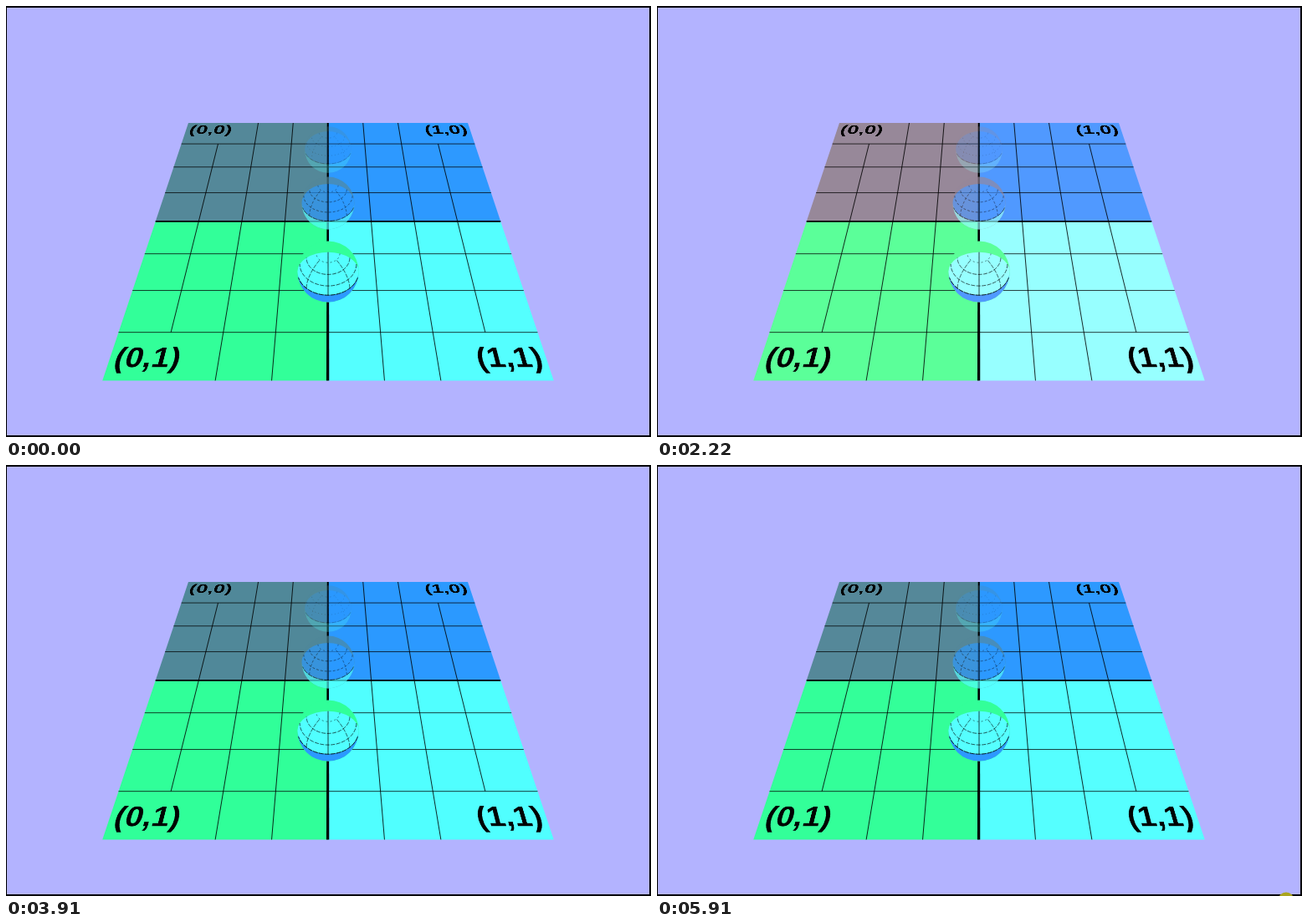
Write an HTML page that moves like this. It is 771 px wide and 516 px high and loops after 5.99 s.

```html
<!DOCTYPE html>
<html lang="en">
<head>
<meta charset="utf-8">
<title>Texture coordinates</title>
<style>
  html, body { margin: 0; width: 100%; height: 100%; overflow: hidden; background: #b3b3ff; }
  #stage { --r: 84; position: absolute; left: 0; top: 0; width: 771px; height: 516px; overflow: hidden; background: #b3b3ff; }
  svg { position: absolute; left: 0; top: 0; display: block; }
  .red { fill: rgb(var(--r), 136, 153); }
  .blue { fill: rgb(calc(var(--r) * .533), 153, 255); }
  .green { fill: rgb(calc(var(--r) * .6), 255, 153); }
  .white { fill: rgb(var(--r), 255, 255); }
  .line { fill: none; stroke: #000; }
  .frame { position: absolute; inset: 0; border: solid #000; border-width: 2px 2px 2px 1px; }
  /* Projects the unit square (1000 x 1000) onto the floor. */
  #labels {
    transform-origin: 0 0;
    transform: matrix3d(.334, 0, 0, 0, -.14665, .13765, 0, -.0003809, 0, 0, 1, 0, 218, 140, 0, 1);
    font: bold 73px "Liberation Sans", Arial, sans-serif;
  }
  .end { text-anchor: end; }
  #dot { fill: #aaa51e; visibility: hidden; }
</style>
</head>
<body>
<div id="stage">
  <svg id="floor" width="771" height="516"></svg>
  <svg id="labels" width="1000" height="1000">
    <text x="12" y="66">(0,0)</text>
    <text x="990" y="66" class="end">(1,0)</text>
    <text x="12" y="967">(0,1)</text>
    <text x="990" y="967" class="end">(1,1)</text>
  </svg>
  <svg id="balls" width="771" height="516"></svg>
  <div class="frame"></div>
  <svg width="771" height="516"><circle id="dot" cx="752" cy="521" r="9.5"/></svg>
</div>
<script>
const $ = id => document.getElementById(id);
const CX = 385;
const fix = n => n.toFixed(2);

function add(parent, tag, attrs) {
  const el = document.createElementNS('http://www.w3.org/2000/svg', tag);
  for (const k in attrs) el.setAttribute(k, attrs[k]);
  return parent.appendChild(el);
}

// Floor coordinates (0..1) to the stage.
function project(u, v) {
  const w = 334 / (1 - .3809 * v);
  return [CX + (u - .5) * w, 140 + 1.5012 * (w - 334)];
}

function points(list) {
  return list.map(([u, v]) => project(u, v).map(fix).join()).join(' ');
}

function drawFloor() {
  const svg = $('floor');
  const quad = (cls, u, v) => add(svg, 'polygon', {
    class: cls, points: points([[u, v], [u + .5, v], [u + .5, v + .5], [u, v + .5]])
  });
  const line = (a, b, width) => add(svg, 'polyline', {
    class: 'line', 'stroke-width': width, points: points([a, b])
  });
  quad('red', 0, 0);
  quad('blue', .5, 0);
  quad('green', 0, .5);
  quad('white', .5, .5);
  for (let i = 1; i < 8; i++) {
    const t = i / 8;
    const cut = i === 1 || i === 7 ? 1 / 8 : 0;
    line([0, t], [1, t], i === 4 ? 1.8 : .75);
    if (i !== 4) line([t, cut], [t, 1 - cut], .85);
  }
  const left = .4962, right = .5024;
  add(svg, 'polygon', { points: points([[left, 0], [right, 0], [right, 1], [left, 1]]) });
}

// A globe seen from above; tilt is the sine of the viewing elevation.
function drawBall(cy, r, tilt, alpha, [cap, main, south], dash) {
  const rise = Math.sqrt(1 - tilt * tilt);
  const g = add($('balls'), 'g', { transform: `translate(${CX} ${cy})`, opacity: alpha });
  const low = fix(r * tilt), high = fix(r * rise);
  add(g, 'circle', { class: cap, r });
  add(g, 'path', { class: main, d: `M${-r} 0A${r} ${high} 0 0 1 ${r} 0A${r} ${low} 0 0 1 ${-r} 0Z` });
  add(g, 'path', { class: south, d: `M${-r} 0A${r} ${low} 0 0 0 ${r} 0A${r} ${r} 0 0 1 ${-r} 0Z` });

  const curve = (at, width, pattern) => {
    let d = '';
    for (let i = 0; i <= 60; i++) {
      const [lat, lon] = at(i / 60).map(a => a * Math.PI / 180);
      const up = Math.sin(lat), out = Math.cos(lat) * Math.sin(lon);
      d += (i ? 'L' : 'M') + fix(r * Math.cos(lat) * Math.cos(lon)) + ' ' + fix(r * (out * tilt - up * rise));
    }
    add(g, 'path', { class: 'line', d, 'stroke-width': width, 'stroke-dasharray': pattern });
  };
  for (const lat of [22.5, 45]) curve(s => [lat, s * 180], .65, dash);
  curve(s => [67.5, s * 180], .5, '2 3');
  curve(s => [0, 15 + s * 150], .9, '6 1');
  for (const lon of [45, 135]) curve(s => [s * 67.5, lon], .65, dash);
  curve(s => [s * 90, 90], .8, 'none');
}

drawFloor();
drawBall(172, 27.8, .61, .25, ['red', 'blue', 'white'], '1 3');
drawBall(236, 31.5, .68, .66, ['red', 'blue', 'white'], '3 2');
drawBall(318, 36.6, .77, 1, ['green', 'white', 'blue'], '5 1.5');

// Red ramps up about once a second and drops back to zero: [step, phase].
const LOOP = 5990, STEPS = 78;
const ramp = [[0, .328], [9, 1.0001], [20, 1.884], [37, 3.22], [51, 4.314], [62, 5.133], [77, 6.333]];

function phase(n) {
  const i = Math.max(1, ramp.findIndex(([step]) => step >= n));
  const [n0, p0] = ramp[i - 1], [n1, p1] = ramp[i];
  return p0 + (p1 - p0) * (n - n0) / (n1 - n0);
}

let start = null;
function tick(now) {
  if (start === null) start = now;
  const t = (now - start) % LOOP;
  const n = Math.min(STEPS - 1, Math.floor((t + 8) * STEPS / LOOP));
  $('stage').style.setProperty('--r', Math.round(phase(n) % 1 * 255));
  $('dot').style.visibility = n === STEPS - 1 ? 'visible' : 'hidden';
  requestAnimationFrame(tick);
}
requestAnimationFrame(tick);
</script>
</body>
</html>
```
